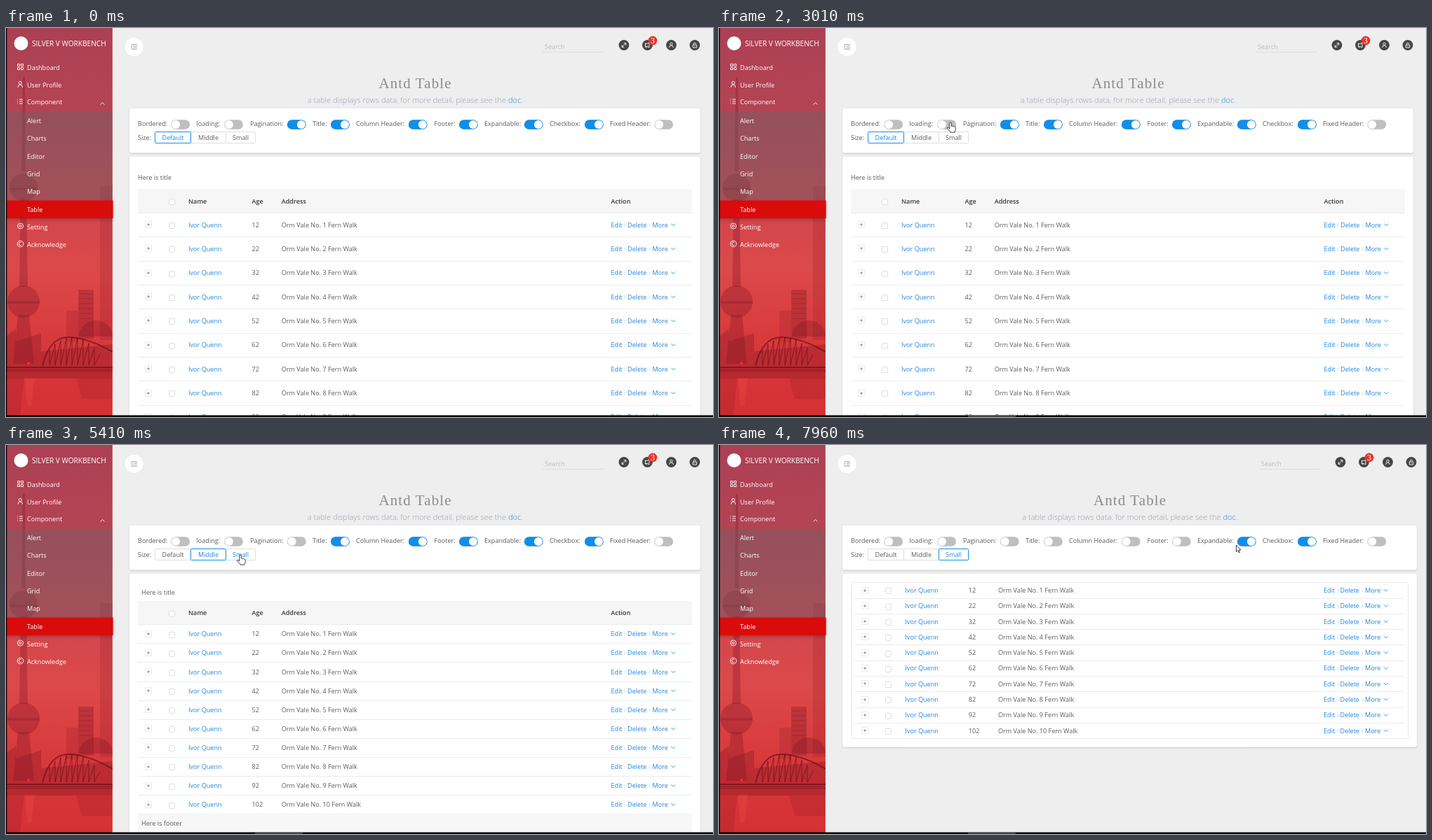
These frames come from a looping animation (1008 by 556 pixels, 8 s). An HTML page:

```html
<!DOCTYPE html>
<html lang="en">
<head>
<meta charset="utf-8">
<title>Table settings</title>
<style>
html, body { margin: 0; width: 100%; height: 100%; overflow: hidden; background: #eee; }
svg { display: block; width: 1008px; height: 556px; }
text { font: 9.1px "Open Sans", "Noto Sans", sans-serif; fill: #5c5c5c; white-space: pre; }
.menu text { fill: #fff; }
.icon { fill: none; stroke: #fff; stroke-width: .9; }
.link { fill: #1c86e2; }
.head { font-weight: 600; fill: #383838; }
.brand { font-size: 10.1px; }
.title { font: 21px "Liberation Serif", serif; letter-spacing: 1.1px; fill: #8c8c8c; }
.sub { font-size: 11.1px; font-weight: 300; fill: #9a9fb5; }
.search { fill: #bbb; }
.badge { font: 12px "Liberation Serif", serif; fill: #fff; }
.card { fill: #fff; filter: drop-shadow(0 1px 1.2px rgba(0,0,0,.16)); }
.mid { text-anchor: middle; }
</style>
</head>
<body>
<svg id="stage" viewBox="0 0 1008 556"></svg>
<script>
const LOOP = 8000;
const BLUE = '#108ee9';
const range = n => [...Array(n).keys()];
const clamp = v => Math.max(0, Math.min(1, v));
const smooth = v => v * v * (3 - 2 * v);
const crisp = v => Math.floor(v) + .5;
const $ = id => document.getElementById(id);

const text = (x, cy, s, cls = '') => `<text x="${x}" y="${cy + 3.3}" class="${cls}">${s}</text>`;
const rect = (x, y, w, h, fill, more = '') =>
  `<rect x="${x}" y="${y}" width="${w}" height="${h}" fill="${fill}" ${more}/>`;
const circle = (x, y, r, fill, more = '') => `<circle cx="${x}" cy="${y}" r="${r}" fill="${fill}" ${more}/>`;
const path = (d, more = '') => `<path d="${d}" ${more}/>`;
const line = (d, color = '#e8e8e8', w = 1) => path(d, `fill="none" stroke="${color}" stroke-width="${w}"`);

// label, label x, switch x, initially on, toggle times
const SWITCHES = [
  ['Bordered', 188, 235.3, 0, [1780, 2460]],
  ['loading', 271.5, 311.2, 0, [3180, 4870]],
  ['Pagination', 348, 400.9, 1, [4040]],
  ['Title', 437, 463, 1, [6240]],
  ['Column Header', 499, 573.9, 1, [6960]],
  ['Footer', 610.5, 646, 1, [7660]],
  ['Expandable', 682, 738.9, 1, []],
  ['Checkbox', 775, 825, 1, []],
  ['Fixed Header', 861, 924.4, 0, []]
];
const SIZES = [['Default', 212.5, 51], ['Middle', 263.5, 50], ['Small', 313.5, 42]];

// time, x, y of the pointer tip
const POINTER = [
  [760, 906, 473], [1080, 560, 270], [1390, 243, 158], [1550, 251, 135],
  [2500, 251, 135], [2860, 330, 135], [3350, 330, 135], [3900, 415, 136],
  [4080, 415, 136], [4330, 321, 142], [4700, 325, 137], [4880, 325, 137],
  [5110, 290, 156], [5180, 290, 156], [5400, 334, 157], [5580, 334, 157],
  [5950, 478, 136], [6320, 478, 136], [6760, 592, 134], [7020, 592, 134],
  [7460, 661, 136], [7680, 661, 136], [7960, 737.5, 143]
];

function isOn(index, t) {
  const [, , , start, times] = SWITCHES[index];
  return (start + times.filter(x => t >= x).length) % 2;
}

function switchAmount(index, t) {
  const last = SWITCHES[index][4].filter(x => t >= x).pop();
  const now = isOn(index, t);
  if (last === undefined) return now;
  const k = smooth(clamp((t - last + 60) / 260));
  return now ? k : 1 - k;
}

const sizeAt = t => t < 5140 ? 0 : t < 5550 ? 1 : 2;

function pointerAt(t) {
  if (t < POINTER[0][0]) return null;
  const i = POINTER.findIndex(p => p[0] > t);
  if (i < 0) return POINTER[POINTER.length - 1].slice(1);
  const [t0, x0, y0] = POINTER[i - 1], [t1, x1, y1] = POINTER[i];
  const k = smooth((t - t0) / (t1 - t0));
  return [x0 + (x1 - x0) * k, y0 + (y1 - y0) * k];
}

function cityView() {
  const dark = 'rgba(130,22,36,.34)', faint = 'rgba(130,22,36,.2)', iron = 'rgba(95,12,22,.62)';
  const arch = x => 442 + (x - 95) ** 2 / 62;
  const truss = range(9).map(i => 62 + i * 8).map(x => `M${x} ${arch(x)}V482L${x + 8} ${arch(x + 8)}`).join('');
  const tower = 'M24 70H27L28 205H22ZM21 245H29L31 370H19ZM17 410H33L40 480H10Z';
  return '<g clip-path="url(#side)">' + path(tower, `fill="${dark}"`) +
    circle(25, 228, 20, dark) + circle(25, 391, 23, dark) +
    path('M5 230H45M3 392H48', `stroke="${dark}" stroke-width="3"`) +
    rect(134, 226, 18, 220, faint) + rect(103, 374, 22, 70, dark) + rect(86, 404, 17, 45, faint) +
    line(range(6).map(i => `M104 ${380 + i * 7}H124`).join(''), faint, 2) +
    path('M104 441A24 23 0 0 1 152 441Z', `fill="${dark}"`) +
    path('M1 440L14 430V448L50 436V462L152 452V492H1Z', `fill="${dark}"`) +
    line('M52 483Q62 441 90 442T152 463M1 485H152', iron, 2) + line(truss, iron, 1) +
    rect(1, 487, 151, 14, 'rgba(110,14,26,.3)') + circle(32, 479, 1.8, '#f33') +
    path('M1 501H26L20 556H1ZM100 501H152V530H108Z', `fill="${faint}"`) +
    path('M27 500H41L36 540H30Z', 'fill="rgba(255,90,80,.2)"') + '</g>';
}

function sidebar() {
  const items = [['Dashboard', 57], ['User Profile', 82], ['Component', 106], ['Setting', 284.5], ['Acknowledge', 310]];
  const subs = ['Alert', 'Charts', 'Editor', 'Grid', 'Map', 'Table'];
  const icons = 'M16.5 51.5h3v3h-3zM21.5 51.5h3v3h-3zM16.5 56.5h3v3h-3zM21.5 56.5h3v3h-3z' +
    'M17 85q0-4 3.3-4t3.3 4M16 102h1m2 0h5M16 105h1m2 0h5M16 108h1m2 0h5M134.5 109.5l3-3 3 3';
  return rect(0, 0, 151.8, 556, 'url(#red)') + cityView() +
    rect(1, 120, 150.8, 126, 'rgba(105,95,105,.42)') +
    rect(1, 246.5, 151.6, 25.5, '#d90b0b', 'style="filter:drop-shadow(0 2px 2px rgba(0,0,0,.22))"') +
    '<g class="menu">' + circle(21.5, 22, 10, '#fff') + text(37, 22.5, 'SILVER V WORKBENCH', 'brand') +
    items.map(([s, y]) => text(30, y, s)).join('') +
    subs.map((s, i) => text(30, 132.7 + i * 25.3, s)).join('') + '</g>' +
    '<g class="icon">' + path(icons) + circle(20.3, 78.5, 2.1, 'none') +
    circle(20.5, 283, 4, 'none') + circle(20.5, 283, 1.5, 'none') +
    circle(20.5, 308.5, 4.4, 'none') + path('M22.3 307a2.3 2.3 0 1 0 0 3') + '</g>' +
    rect(0, 0, 1.3, 556, '#000');
}

function topBar() {
  const spots = [881, 914.5, 948.5, 982];
  const marks = 'M878.2 27.3l5.6-5.6m-3 0h3v3m-2.6 2.6h-3v-3' +
    'M911.5 22v5l1.5-.8 4 1.6v-6.6l-4 1.5zM913 26v2.3M945.6 28q0-3 2.9-3t2.9 3' +
    'M979.3 24h5.4v4h-5.4zM980.4 24v-1.2a1.6 1.6 0 0 1 3.2 0M982 25.5v1';
  return text(768, 26.5, 'Search', 'search') + line('M765 34.5H853', '#dcdcdc') +
    spots.map(x => circle(x, 24.5, 7.4, '#464646')).join('') +
    `<g class="icon">${path(marks)}${circle(948.5, 22.8, 1.7, 'none')}</g>` +
    circle(922, 18, 6.4, '#e8322b') + '<text x="922" y="22" class="badge mid">3</text>';
}

function settings() {
  return SWITCHES.map(([label, lx, x], i) =>
    text(lx, 137, label + ':') +
    rect(x, 131.2, 26.8, 13.6, '#bfbfbf', 'rx="6.8"') +
    rect(x, 131.2, 26.8, 13.6, BLUE, `rx="6.8" id="on${i}"`) +
    circle(x + 6.8, 138, 6, '#fff', `id="knob${i}"`)).join('') +
    text(188, 157, 'Size:') + '<g id="sizes"></g>';
}

function sizeButtons(active, hover) {
  const border = i => {
    const [, x, w] = SIZES[i];
    return rect(x, 148.5, w, 16, 'none', `rx="1" stroke="${i === active ? BLUE : '#dedede'}"`);
  };
  const order = [0, 1, 2].filter(i => i !== active).concat(active);
  return order.map(border).join('') + SIZES.map(([s, x, w], i) =>
    `<text x="${x + w / 2}" y="160.3" class="mid ${i === active || i === hover ? 'link' : ''}">${s}</text>`).join('');
}

function layout(t) {
  const size = sizeAt(t), small = size === 2;
  const title = isOn(3, t), header = isOn(4, t), footer = isOn(5, t);
  const top = 196, right = small ? 982.5 : 978;
  const headTop = top + (title ? [34, 27, 28][size] : 0);
  const rowTop = headTop + (header ? [34.3, 33.7, 35][size] : .8);
  const rowH = [34.35, 27.1, 22.29][size];
  const end = rowTop + rowH * 10;
  const bottom = end + (footer ? [34, 27, 27.2][size] : 0);
  return { size, small, title, header, footer, top, right, headTop, rowTop, rowH, end, bottom, bordered: isOn(0, t) };
}

const checkbox = (cy, dx) => rect(crisp(232.5 + dx), crisp(cy - 4), 8, 8, '#fff', 'rx="1" stroke="#dedede"');

function tableRow(i, cy, dx) {
  const sx = dx ? -.5 : 0;
  const bx = crisp(198 + dx), by = crisp(cy - 4.7);
  return rect(bx, by, 9, 9, '#fff', 'stroke="#ececec"') +
    line(`M${bx + 2.5} ${by + 4.5}h4m-2-2v4`, '#777', .8) + checkbox(cy + 1.2, dx) +
    text(260 + dx, cy, 'Ivor Quenn', 'link') +
    text(350.5 + dx, cy, i * 10 + 12) +
    text(392.7 + dx, cy, `Orm Vale No. ${i + 1} Fern Walk`) +
    text(862.5 + sx, cy, 'Edit', 'link') + text(886 + sx, cy, 'Delete', 'link') + text(921.5 + sx, cy, 'More', 'link') +
    line(`M882.5 ${cy - 2}v5M917.5 ${cy - 2}v5`, '#ddd') +
    line(`M${948.5 + sx} ${cy - 1.5}l2.8 2.8 2.8-2.8`, BLUE, .9);
}

function table(L) {
  const { size, small, top, right, headTop, rowTop, rowH, end, bottom } = L;
  const dx = small ? 5.3 : 0, inset = small ? 5 : 0;
  const x0 = 188 + inset, x1 = right - inset;
  const rule = (y, from = x0, to = x1) => line(`M${from} ${crisp(y)}H${to}`, '#ebebeb');
  let out = '';
  if (L.title) {
    out += text(L.bordered ? 198 : size ? 193 : 188, size ? 210.5 : 214, 'Here is title');
    if (small) out += rule(headTop, 188, right);
  }
  if (L.header) {
    const cy = (headTop + rowTop) / 2 + .3;
    if (!small) out += rect(188, headTop, right - 188, rowTop - headTop, '#f6f6f6');
    out += checkbox(cy + 1.2, dx) + text(260 + dx, cy, 'Name', 'head') + text(350.5 + dx, cy, 'Age', 'head') +
      text(392.7 + dx, cy, 'Address', 'head') + text(862.5 - (small ? .5 : 0), cy, 'Action', 'head') + rule(rowTop);
  }
  range(10).forEach(i => {
    out += tableRow(i, rowTop + rowH * (i + .5) - .2, dx);
    if (!small || i < 9) out += rule(rowTop + rowH * (i + 1));
  });
  if (L.footer) {
    out += rect(188, end, right - 188, bottom - end, '#f7f7f7') +
      text(193, end + 13.4, 'Here is footer');
    if (small) out += rule(end, 188, right);
  }
  if (small) out += rect(188.5, top + .5, 794, Math.round(bottom - top - .5), 'none', 'rx="2" stroke="#e8e8e8"');
  if (L.bordered) {
    out += rect(188.5, top + .5, right - 189, 420, 'none', 'rx="2" stroke="#e4e4e4"') + rule(headTop, 188, right) +
      line([218.5, 250.5, 340.5, 382.5, 852.5].map(x => `M${x} ${headTop}V556`).join(''), '#e4e4e4');
  }
  return out;
}

$('stage').innerHTML = `
  <defs><linearGradient id="red" x1="0" y1="0" x2="0" y2="1">
    <stop offset="0" stop-color="#ac4054"/><stop offset=".22" stop-color="#b44453"/>
    <stop offset=".45" stop-color="#cf464c"/><stop offset=".62" stop-color="#dc494a"/>
    <stop offset=".8" stop-color="#d83a3c"/><stop offset="1" stop-color="#d63034"/>
  </linearGradient><clipPath id="side">${rect(0, 0, 151.8, 556, '#000')}</clipPath></defs>
  ${rect(0, 0, 1008, 556, '#eee')}
  ${sidebar()}
  ${circle(182.5, 27, 13, '#fff')}
  ${line('M178.5 24h8.5M181.5 27h5.5M178.5 30h8.5M179.8 26l-1.4 1 1.4 1', '#777', .8)}
  <g id="bar">${topBar()}</g>
  <g id="heading"><text x="583.5" y="86" class="title mid">Antd Table</text>
  <text x="583.3" y="106.5" class="sub mid">a table displays rows data, for more detail, please see the <tspan class="link">doc</tspan>.</text></g>
  <rect id="card1" class="card" x="176" y="115" height="63.5" rx="3"/>
  ${settings()}
  <rect id="card2" class="card" x="176" y="184" rx="3"/>
  <g id="table"></g><g id="spinner"></g>
  ${rect(0, 553.5, 1008, 2.5, '#000')}
  <rect id="task" x="355" y="554" width="68" height="2"/>
  <g id="pointer" fill="#fff" stroke="#111" stroke-width=".8" stroke-linejoin="round">
    ${path('M0 0V9.5L2.2 7.5L3.8 11L5.2 10.4L3.7 7H6.6Z', 'id="arrow"')}
    ${path('M-1.3 8V1.2a1.3 1.3 0 0 1 2.6 0V5.2q1.3-.6 2.2.3q1.3-.5 2.1.5q1.6-.1 1.6 1.6v2.6q0 1.8-1.2 3.2v.8h-6v-.9L-4.6 8.8q-.6-1.6.9-1.6q1 .2 2.4 2z', 'id="hand"')}
  </g>`;

const shown = {};
function fill(id, key, build) {
  if (shown[id] === key) return;
  shown[id] = key;
  $(id).innerHTML = build();
}
const set = (id, name, value) => $(id).setAttribute(name, value);

function overLink(x, y, L) {
  if (x > 954 || y < L.rowTop || y > L.end) return false;
  const near = Math.abs((y - L.rowTop) % L.rowH - L.rowH / 2) < 6;
  return near && (x > 862 || x > 260 && x < 310);
}

function drawSpinner(t, amount) {
  const dots = range(4).map(i => {
    const a = (-70 + i * 90 + (t - 4330) * .3) * Math.PI / 180;
    const wave = Math.abs(((t - 3180) / 1000 - i * .4 + 4) % 2 - 1);
    return circle(582.8 + 5 * Math.cos(a), 292.9 + 5 * Math.sin(a), 2.4, BLUE, `opacity="${1 - .6 * wave}"`);
  });
  $('spinner').innerHTML = amount > 0 ? dots.join('') : '';
  set('spinner', 'opacity', amount);
}

function draw(t) {
  const L = layout(t);
  SWITCHES.forEach((s, i) => {
    const k = switchAmount(i, t);
    set('on' + i, 'opacity', k);
    set('knob' + i, 'cx', s[2] + 6.8 + 13.2 * k);
  });

  const wide = L.small ? 5 : 0;
  set('bar', 'transform', `translate(${wide})`);
  set('heading', 'transform', `translate(${wide / 2})`);
  set('card1', 'width', 814 + wide);
  set('card2', 'width', 814 + wide);
  set('card2', 'height', L.small ? L.bottom + 12 - 184 : 400);
  fill('table', JSON.stringify(L), () => table(L));

  const loading = switchAmount(1, t);
  set('table', 'opacity', 1 - .52 * loading);
  drawSpinner(t, loading);

  const spot = pointerAt(t);
  let hover = -1;
  set('pointer', 'visibility', spot ? 'visible' : 'hidden');
  if (spot) {
    const [x, y] = spot;
    if (y > 148 && y < 165) hover = SIZES.findIndex(([, sx, w]) => x >= sx && x < sx + w);
    const onSwitch = y > 131 && y < 145 && SWITCHES.some(s => x >= s[2] && x <= s[2] + 26.8);
    const hand = onSwitch || hover >= 0 || overLink(x, y, L);
    set('pointer', 'transform', `translate(${x} ${y})`);
    set('arrow', 'display', hand ? 'none' : 'inline');
    set('hand', 'display', hand ? 'inline' : 'none');
  }
  fill('sizes', L.size + ':' + hover, () => sizeButtons(L.size, hover));
  set('task', 'fill', t < 1630 ? '#000' : t < 2460 ? '#bbb' : '#444');
}

const begin = performance.now();
function tick() {
  draw((performance.now() - begin) % LOOP);
  requestAnimationFrame(tick);
}
tick();
</script>
</body>
</html>
```
